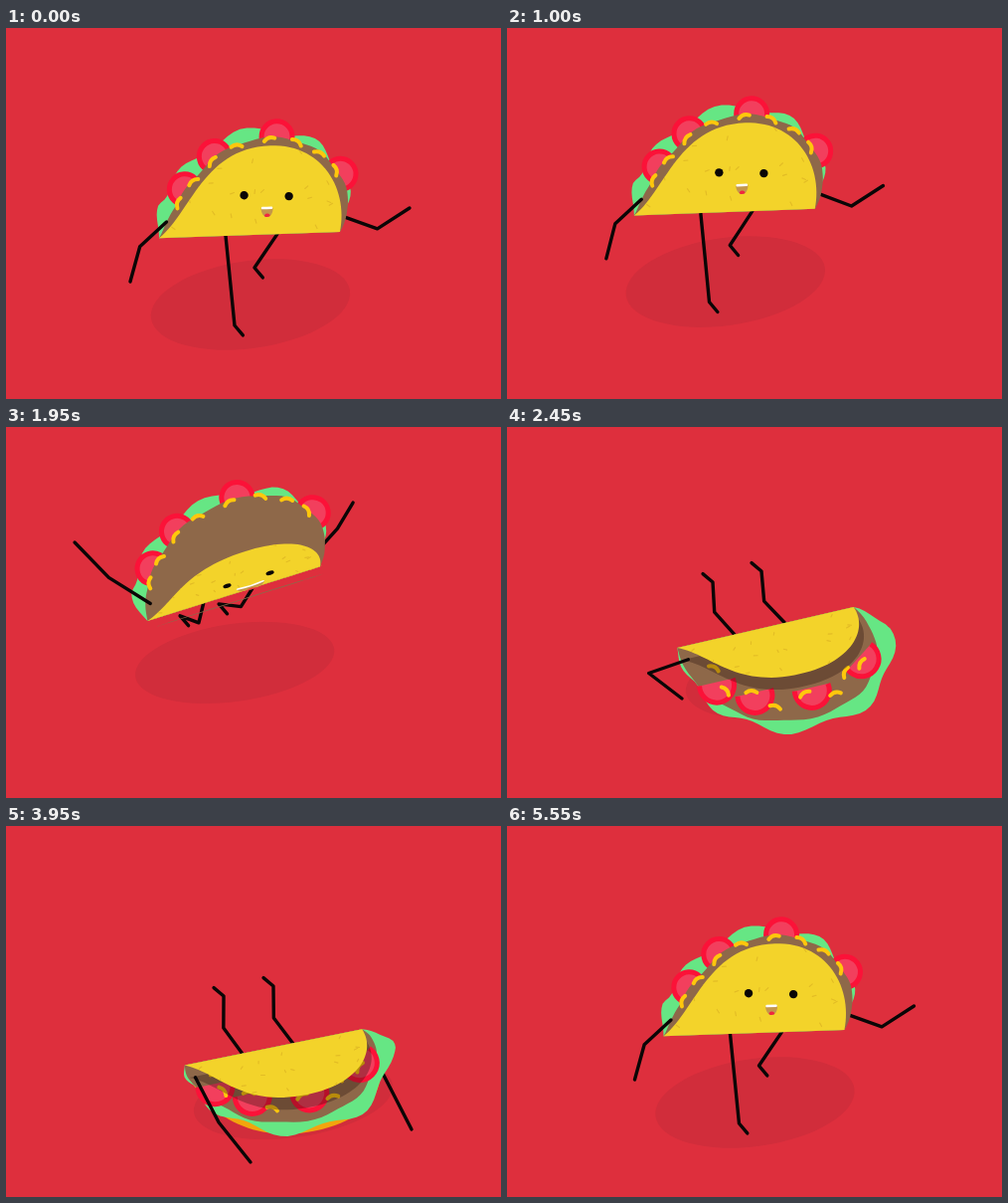
An HTML page with a canvas that plays this animation: 498 by 373 pixels, repeating every 5600 ms.

```html
<!DOCTYPE html>
<html lang="en">
<head>
<meta charset="utf-8">
<title>Taco</title>
<style>
html, body { margin: 0; width: 100%; height: 100%; overflow: hidden; background: #de2f3d; }
canvas { display: block; }
</style>
</head>
<body>
<canvas id="stage" width="498" height="373"></canvas>
<script>
const ctx = document.getElementById('stage').getContext('2d');
const LOOP = 5600, TAU = Math.PI * 2, DEG = Math.PI / 180;
const INK = '#0a0606', MEAT = '#8e6849';
const lerp = (a, b, t) => a + (b - a) * t;
const clamp = v => Math.max(0, Math.min(1, v));

// tip: 0 upright, 1 tipping over, 2 face down.
// Each limb: hand or ankle relative to the body, then the bend of its joint.
const pose = (angle, tip, slide, smile, armL, armR, legL, legR) =>
  [angle, tip, slide, smile, ...armL, ...armR, ...legL, ...legR];
const STEP = pose(-2, 0, 0, 0, [-122, 47, 10], [159, -27, 17], [-17, 91, 0], [3, 33, 0]);
const LEAN = pose(-15.3, 0, 0, 1, [-27, 23, 27], [35, 15, 16], [-45, 38, -6], [44, 72, 0]);
const LEAP = pose(-17.5, 1, 0, .8, [-162, -51, -6], [118, -91, 3], [-56, 23, -15], [-17, 11, -12]);
const FLOP = pose(-13, 2, 0, .8, [-86, 72, 37], [119, 30, -18], [-55, -45, -10], [-6, -56, -10]);
const PUSH = pose(-11.5, 2, 1, .5, [-25, 116, 5], [137, 83, 0], [-52, -51, -10], [-2, -61, -10]);
const RISE = [-14, 1, 0, .3, ...LEAN.slice(4)];

const KEYS = [
  [0, 247, 208, STEP], [550, 238, 204, LEAN], [975, 222, 186, STEP], [1400, 201.5, 173, LEAN],
  [1720, 214, 160, STEP], [1950, 231, 167, LEAP], [2250, 262, 211, FLOP], [2450, 262, 201, FLOP],
  [3000, 262, 204, FLOP], [3950, 271, 222, PUSH], [4400, 268, 214, PUSH], [4750, 264, 208, RISE],
  [5100, 260, 206, LEAN], [5550, 250.5, 208, STEP]
].map(([t, x, y, p]) => ({ t, v: [x, y, ...p] }));

const keyAt = i => {
  const turn = Math.floor(i / KEYS.length), k = KEYS[i - turn * KEYS.length];
  return { t: k.t + turn * LOOP, v: k.v };
};

// Smooth interpolation without overshoot
function sample(t) {
  const i = KEYS.findLastIndex(k => k.t <= t);
  const [a, b, c, d] = [i - 1, i, i + 1, i + 2].map(keyAt);
  const h = c.t - b.t, u = (t - b.t) / h, w = 1 - u;
  const tangent = (p, q) => p * q <= 0 ? 0 : 2 * p * q / (p + q);
  return b.v.map((y, j) => {
    const s0 = (y - a.v[j]) / (b.t - a.t), s1 = (c.v[j] - y) / h;
    const s2 = (d.v[j] - c.v[j]) / (d.t - c.t);
    return y * (1 + 2 * u) * w * w + c.v[j] * u * u * (3 - 2 * u)
      + h * u * w * (w * tangent(s0, s1) - u * tangent(s1, s2));
  });
}

const bez = (a, b, c, d, t) =>
  a * (1 - t) ** 3 + 3 * b * t * (1 - t) ** 2 + 3 * c * t * t * (1 - t) + d * t ** 3;

// The folded outline from left corner (u = 0) over the top to the right corner (u = 1);
// "full" rounds out its sides
function arch(u, full) {
  if (u < .5) {
    return [bez(-93, lerp(-60, -92, full), lerp(-45, -50, full), 22, u * 2),
      bez(0, lerp(-25, -45, full), -89, -89, u * 2)];
  }
  return [bez(22, lerp(75, 100, full), lerp(99, 114, full), 89, u * 2 - 1),
    bez(-89, -89, -42, 0, u * 2 - 1)];
}

// Point at a distance outside the arch, then flattened or flipped by k
function edge(u, out, { k, full, slide = 0 }) {
  const [x, y] = arch(u, full);
  const [x0, y0] = arch(Math.max(0, u - .01), full), [x1, y1] = arch(Math.min(1, u + .01), full);
  const len = Math.hypot(x1 - x0, y1 - y0);
  const px = x + out * (y1 - y0) / len, py = (y - out * (x1 - x0) / len) * k;
  const shift = slide * clamp(py / 50);
  return [px - 5 * shift, py - 20 * shift];
}

function blob(form, out = () => 0) {
  const path = new Path2D();
  for (let i = 0; i <= 60; i++) path.lineTo(...edge(i / 60, out(i / 60), form));
  path.closePath();
  return path;
}

function fill(path, color) {
  ctx.fillStyle = color;
  ctx.fill(path);
}

function ellipse(x, y, rx, ry, color, turn = 0) {
  ctx.fillStyle = color;
  ctx.beginPath();
  ctx.ellipse(x, y, rx, ry, turn, 0, TAU);
  ctx.fill();
}

function line(pts, color, width) {
  ctx.strokeStyle = color;
  ctx.lineWidth = width;
  ctx.beginPath();
  for (const [x, y] of pts) ctx.lineTo(x, y);
  ctx.stroke();
}

function limb([x0, y0], [x1, y1, bend], footAngle) {
  const len = Math.hypot(x1 - x0, y1 - y0) || 1;
  const joint = [(x0 + x1) / 2 - bend * (y1 - y0) / len, (y0 + y1) / 2 + bend * (x1 - x0) / len];
  const pts = [[x0, y0], joint, [x1, y1]];
  if (footAngle !== undefined) {
    pts.push([x1 + 13 * Math.cos(footAngle), y1 + 13 * Math.sin(footAngle)]);
  }
  line(pts, INK, 3.4);
}

function tomatoes(form, down) {
  const half = lerp(Math.PI, 1.75, clamp(down * 2 - 1));
  [.2, .34, .52, .78].forEach((u, i) => {
    const [x, y] = edge(u, 9 - 29 * down * Math.sin(Math.PI * u), form);
    const mid = (i === 3 ? 55 : 90) * DEG;
    ctx.beginPath();
    ctx.arc(x, y, 15.5 + 2 * clamp(down + 1 - form.k), mid - half, mid + half);
    ctx.fillStyle = '#f23f5d';
    ctx.fill();
    ctx.strokeStyle = '#fb1238';
    ctx.lineWidth = 5;
    ctx.lineCap = 'butt';
    ctx.stroke();
    ctx.lineCap = 'round';
  });
}

function cheese(form, down) {
  ctx.strokeStyle = '#ffc70c';
  ctx.lineWidth = 4;
  for (let i = 0; i < 8; i++) {
    const u = .15 + .087 * i, odd = i % 2 ? 1 : -1;
    const out = lerp(7, -14, down) + odd * 5 * down;
    const [x, y] = edge(u, out, form), [nx, ny] = edge(u + .02, out, form);
    ctx.save();
    ctx.translate(x, y);
    ctx.rotate(Math.atan2(ny - y, nx - x) + odd * .3);
    ctx.beginPath();
    ctx.moveTo(-5.5, 1);
    ctx.quadraticCurveTo(0, -3, 5.5, 1);
    ctx.stroke();
    ctx.restore();
  }
}

let seed = 11;
const rnd = () => (seed = seed * 16807 % 2147483647) / 2147483647;
const SPECKS = Array.from({ length: 28 }, () => [lerp(-85, 88, rnd()), lerp(4, 84, rnd()), rnd() * 3]);

function shell(k) {
  const path = blob({ k, full: 0 });
  fill(path, '#f3d32a');
  ctx.save();
  ctx.clip(path);
  for (const [x, h, a] of SPECKS) {
    line([[x, -h * k], [x + 4 * Math.cos(a), -(h + 4 * Math.sin(a)) * k]], '#e3bd25', 1.2);
  }
  ctx.restore();
}

function face(k, smile, lid) {
  const a = lid * Math.PI - Math.PI / 2;
  ctx.fillStyle = INK;
  for (const [x, y] of [[-6, -40], [39, -37.5]]) {
    ctx.beginPath();
    ctx.ellipse(x, y * k, 4.2, 4.2 * Math.max(k, .5), 0, a, Math.PI - a);
    ctx.fill();
  }
  const w = lerp(6, 16.5, smile), sag = 5 * smile, h = lerp(12, 15, smile);
  ctx.save();
  ctx.translate(16.5, -26.5 * k + (1 - k) * 4);
  ctx.scale(1, Math.max(k, .42));
  const mouth = new Path2D();
  mouth.moveTo(-w, 0);
  mouth.quadraticCurveTo(0, sag, w, 0);
  mouth.bezierCurveTo(w, h, -w, h, -w, 0);
  fill(mouth, '#c4974a');
  ctx.save();
  ctx.clip(mouth);
  ellipse(0, h * .75, w * .5, 3.5, '#f0263f');
  ctx.restore();
  ctx.strokeStyle = '#fff';
  ctx.lineWidth = lerp(2.5, 4, smile);
  ctx.beginPath();
  ctx.moveTo(1.5 - w, 0);
  ctx.quadraticCurveTo(0, sag, w - 1.5, 0);
  ctx.stroke();
  ctx.restore();
}

function body(tip, slide, smile, lid) {
  const lean = clamp(tip), down = clamp(tip - 1);
  const stuff = { k: lerp(lerp(1, .94, lean), -1.05, down), full: .05 + .45 * lean + .25 * down, slide };
  const ends = u => Math.min(1, 3 * Math.sin(Math.PI * u));
  const ripple = u => lerp(27 - 22 * u, 6 + 18 * u, down) + 4 * Math.cos(TAU * (u - .24) / .2);
  const meat = blob(stuff, u => ends(u) * (lerp(8, 5, down) + Math.sin(u * 40)));

  fill(blob({ k: lerp(lerp(.9, .6, lean), -1.02, down), full: lerp(.4, .9, down) }), '#f2a50d');
  fill(blob(stuff, u => ends(u) * ripple(u)), '#66e684');
  if (down < .5) tomatoes(stuff, down);
  fill(meat, MEAT);
  if (down > 0) ellipse(2, 8, 88, 34 * Math.sin(Math.PI * down), MEAT);
  if (down >= .5) tomatoes(stuff, down);
  cheese(stuff, down);

  const front = lerp(1, .42, lean) * (1 - down);
  if (front > .05) shell(front);
  if (down < .5) face(lerp(1, .24, lean) * (1 - down), smile, lid);
  if (down > 0) {
    ctx.save();
    ctx.clip(meat);
    ctx.translate(2, 13 * down);
    fill(blob({ k: -.6 * down, full: 0 }), 'rgba(35,15,10,.32)');
    ctx.restore();
    shell(-.6 * down);
  }
}

function draw(t) {
  const [x, y, angle, tip, slide, smile, ...ends] = sample(t);
  const [armL, armR, legL, legR] = [0, 3, 6, 9].map(i => ends.slice(i, i + 3));
  const turn = angle * DEG, cos = Math.cos(turn), sin = Math.sin(turn);
  const lean = clamp(tip), down = clamp(tip - 1);
  const joint = (px, py) => [px * cos - py * sin, px * sin + py * cos];
  const shoulder = lerp(-16, 14, down), foot = lerp(50, -140, down) * DEG;
  const lid = .5 * clamp(1.3 - Math.abs(t - 1400) / 250);

  ctx.setTransform(1, 0, 0, 1, 0, 0);
  ctx.fillStyle = '#de2f3d';
  ctx.fillRect(0, 0, 498, 373);
  ctx.lineCap = ctx.lineJoin = 'round';
  ctx.translate(x, y);
  ellipse(lerp(-1, 18, down), lerp(70, 52, down), 101, lerp(44, 39, lean), '#d12d3b', -.14);
  limb(joint(91, shoulder), armR);
  limb(joint(-26 - 8 * lean, 0), legL, foot);
  limb(joint(26 - 8 * lean, 0), legR, foot);
  ctx.save();
  ctx.rotate(turn);
  body(tip, slide, smile, lid);
  ctx.restore();
  limb(joint(-85, shoulder), armL);
}

const start = performance.now();
function tick() {
  draw((performance.now() - start) % LOOP);
  requestAnimationFrame(tick);
}
tick();
</script>
</body>
</html>
```
